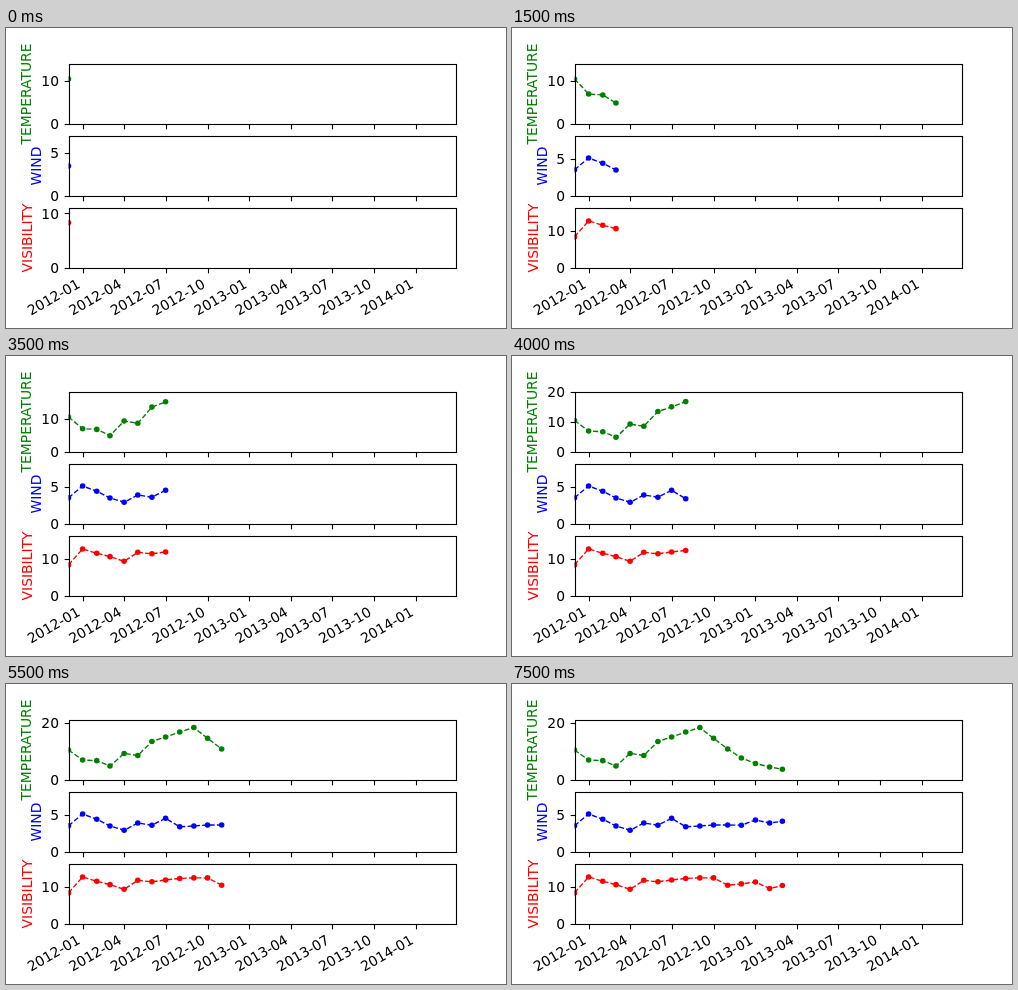
These frames come from a looping animation (500 by 300 pixels, 8000 ms). An HTML page:

```html
<!DOCTYPE html>
<html lang="en">
<head>
<meta charset="utf-8">
<title>Monthly weather</title>
<style>
  html, body { margin: 0; width: 500px; height: 300px; overflow: hidden; background: #fff; }
  svg { display: block; }
  text { font: 13.89px "DejaVu Sans", sans-serif; }
  .axis { fill: none; stroke: #000; stroke-width: 1.11; }
  .line { fill: none; stroke-width: 1.39; stroke-dasharray: 5.14 2.22; }
</style>
</head>
<body>
<svg id="stage" width="500" height="300" viewBox="0 0 500 300"></svg>
<script>
const STEP = 500, COUNT = 16, DAY = 864e5;
const LEFT = 62.5, RIGHT = 450, HEIGHT = 60, DAYS = 850;
const START = Date.UTC(2011, 11, 1);

const panels = [
  { name: 'TEMPERATURE', color: '#008000', top: 36, labelX: 25.3,
    data: [10.51, 7, 6.78, 4.9, 9.3, 8.6, 13.47, 15.05, 16.8, 18.35, 14.6, 10.85, 7.7, 5.8, 4.55, 3.78] },
  { name: 'WIND', color: '#0000ff', top: 108, labelX: 35.3,
    data: [3.5, 5.07, 4.37, 3.47, 2.9, 3.87, 3.57, 4.5, 3.36, 3.47, 3.6, 3.6, 3.57, 4.27, 3.87, 4.1] },
  { name: 'VISIBILITY', color: '#ff0000', top: 180, labelX: 26.3,
    data: [8.3, 12.55, 11.4, 10.5, 9.25, 11.65, 11.25, 11.75, 12.15, 12.3, 12.3, 10.35, 10.7, 11.2, 9.45, 10.25] }
];

const stage = document.getElementById('stage');
const snap = v => Math.floor(v + 0.5) + 0.5;

function add(parent, tag, attrs, text) {
  const el = document.createElementNS('http://www.w3.org/2000/svg', tag);
  for (const key in attrs) el.setAttribute(key, attrs[key]);
  if (text !== undefined) el.textContent = text;
  parent.appendChild(el);
  return el;
}

// x of the first day of a month, counted from January 2012
const monthX = m => LEFT + (Date.UTC(2012, m, 1) - START) / DAY * (RIGHT - LEFT) / DAYS;

function build(p) {
  const bottom = p.top + HEIGHT;
  const clip = add(stage, 'clipPath', { id: p.name });
  add(clip, 'rect', { x: LEFT, y: p.top, width: RIGHT - LEFT, height: HEIGHT });
  p.plot = add(stage, 'g', { 'clip-path': `url(#${p.name})`, fill: p.color, stroke: p.color });
  add(stage, 'rect', { class: 'axis', x: 63.5, y: p.top + 0.5, width: 387, height: HEIGHT });
  for (let m = 0; m <= 24; m += 3) {
    const x = monthX(m);
    add(stage, 'path', { class: 'axis', d: `M${snap(x)} ${bottom + 0.5}v4.86` });
    if (p.top < 180) continue;
    const label = `${2012 + Math.floor(m / 12)}-${String(m % 12 + 1).padStart(2, '0')}`;
    add(stage, 'text', { 'text-anchor': 'end', transform: `translate(${x - 1.5} 258.8) rotate(-30)` }, label);
  }
  add(stage, 'text', {
    'text-anchor': 'middle', fill: p.color,
    transform: `translate(${p.labelX} ${p.top + HEIGHT / 2}) rotate(-90)`
  }, p.name);
  p.ticks = add(stage, 'g', {});
}

function draw(p, last) {
  const shown = p.data.slice(0, last + 1);
  const limit = Math.round(Math.max(...shown)) + 3;
  const toY = v => p.top + HEIGHT * (1 - v / limit);
  const points = shown.map((v, i) => [monthX(i - 1), toY(v)]);

  p.plot.replaceChildren();
  add(p.plot, 'polyline', { class: 'line', points: points.join(' ') });
  for (const [cx, cy] of points) add(p.plot, 'circle', { cx, cy, r: 2.78, stroke: 'none' });

  // at most two intervals fit on the value axis
  const gap = [5, 10, 20].find(s => s >= limit / 2);
  p.ticks.replaceChildren();
  for (let v = 0; v <= limit; v += gap) {
    const y = toY(v);
    add(p.ticks, 'path', { class: 'axis', d: `M63.5 ${snap(y)}h-4.86` });
    add(p.ticks, 'text', { x: 53, y: Math.round(y + 5.07), 'text-anchor': 'end' }, v);
  }
}

let current = -1;
function tick() {
  const step = Math.floor(performance.now() / STEP) % COUNT;
  if (step !== current) {
    current = step;
    panels.forEach(p => draw(p, step));
  }
  requestAnimationFrame(tick);
}

panels.forEach(build);
tick();
</script>
</body>
</html>
```
